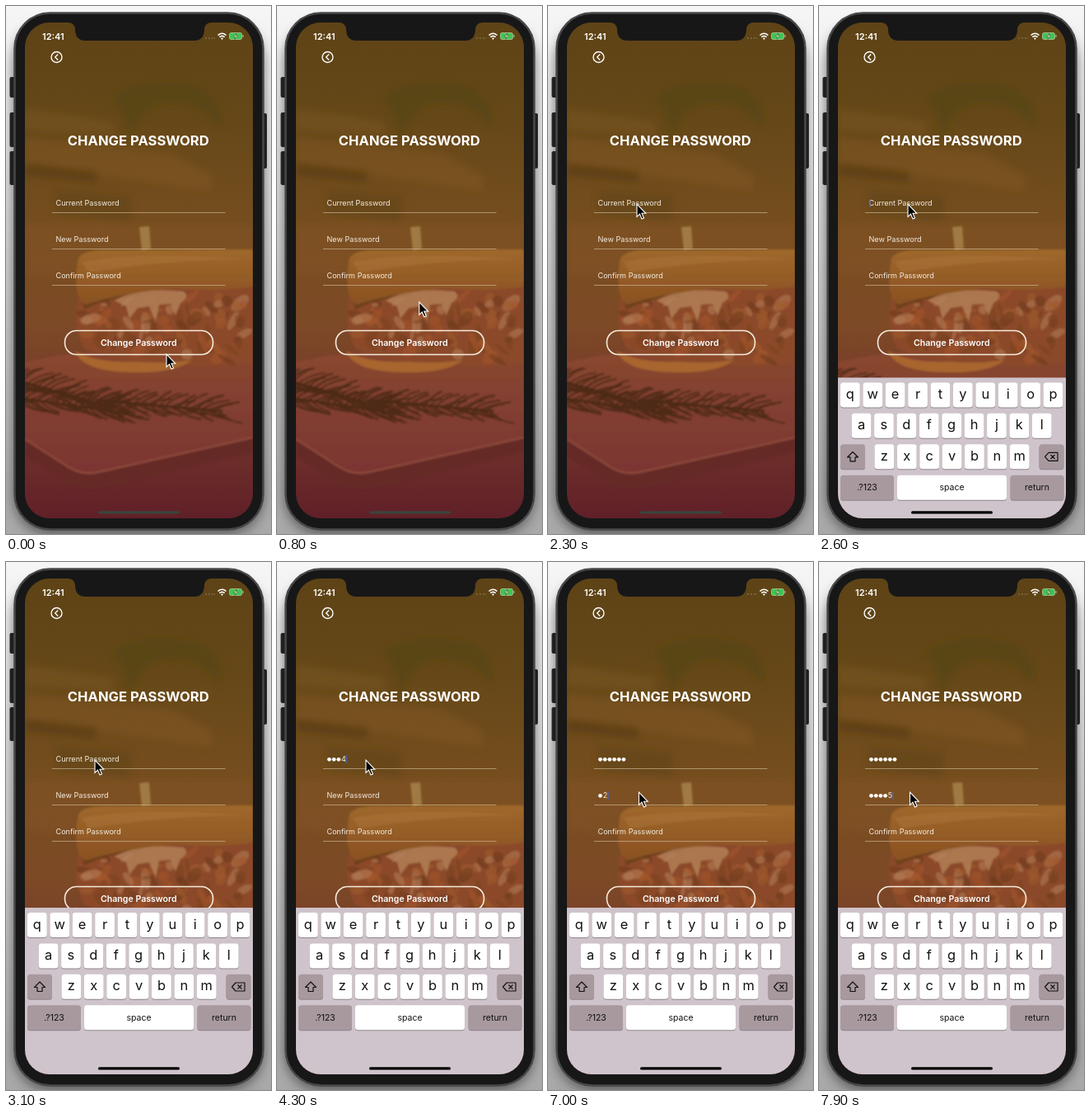
Write an HTML page that moves like this. It is 322 by 640 pixels and loops after 8000 ms.

```html
<!DOCTYPE html>
<html lang="en">
<head>
<meta charset="utf-8">
<title>Change password</title>
<style>
html, body { margin: 0; width: 100%; height: 100%; overflow: hidden; background: #ddd; }
svg { display: block; width: 100vw; height: 100vh; }
text { font-family: Inter, "Open Sans", sans-serif; fill: #fff; }
.bold { font-weight: 600; }
.hint, .digit { font-size: 9.1px; fill: #f3ebdf; }
.line { stroke: #e2cfac; stroke-opacity: .55; }
#board text { fill: #111; text-anchor: middle; }
.icon { fill: none; stroke: #111; stroke-width: 1.2; stroke-linejoin: round; }
</style>
</head>
<body>
<svg viewBox="0 0 322 640">
  <defs>
    <linearGradient id="wall" x2="0" y2="1">
      <stop stop-color="#f6f6f6"/><stop offset=".5" stop-color="#d2d2d2"/><stop offset="1" stop-color="#a8a8a8"/>
    </linearGradient>
    <linearGradient id="tone" x2="0" y2="1">
      <stop stop-color="#5e4316"/><stop offset=".2" stop-color="#664818"/><stop offset=".42" stop-color="#774e1f"/>
      <stop offset=".6" stop-color="#7d4a26"/><stop offset=".78" stop-color="#76382c"/><stop offset="1" stop-color="#602028"/>
    </linearGradient>
    <linearGradient id="wood" x2="0" y2="1">
      <stop stop-color="#89482f"/><stop offset="1" stop-color="#7b3532"/>
    </linearGradient>
    <linearGradient id="bread" x2="0" y2="1">
      <stop stop-color="#9f682b"/><stop offset="1" stop-color="#8a5122"/>
    </linearGradient>
    <filter id="soft" x="-30%" y="-30%" width="160%" height="160%"><feGaussianBlur stdDeviation="7"/></filter>
    <filter id="haze" x="-30%" y="-30%" width="160%" height="160%"><feGaussianBlur stdDeviation="4"/></filter>
    <filter id="edge"><feGaussianBlur stdDeviation=".9"/></filter>
    <clipPath id="screen"><rect x="23" y="20" width="277" height="601" rx="30"/></clipPath>
  </defs>

  <rect width="322" height="640" fill="url(#wall)"/>
  <rect x="8" y="20" width="306" height="622" rx="48" fill="#333" opacity=".6" filter="url(#soft)"/>
  <g fill="#202022">
    <rect x="4.500" y="86" width="8" height="25" rx="2"/><rect x="4.500" y="129" width="8" height="42" rx="2"/>
    <rect x="4.500" y="176" width="8" height="41" rx="2"/><rect x="309" y="130" width="8" height="67" rx="2"/>
  </g>
  <rect x="10.500" y="8.500" width="302" height="626" rx="43" fill="#171718" stroke="#48484b" stroke-width="2.500"/>

  <g clip-path="url(#screen)">
    <rect x="23" y="20" width="277" height="601" fill="url(#tone)"/>
    <g filter="url(#haze)">
      <path d="M23 125L130 140V156L23 150Z" fill="#7b5620" opacity=".5"/>
      <path d="M23 160L200 178 250 205V225L23 192Z" fill="#82581f" opacity=".5"/>
      <path d="M23 190L110 200V214L23 205Z" fill="#573a12" opacity=".6"/>
      <path d="M60 224L152 230V262L60 252Z" fill="#5f4016" opacity=".5"/>
      <path d="M128 110Q165 82 235 98 265 112 262 150 235 112 190 118 160 125 150 165 145 125 128 110Z" fill="#52450f" opacity=".6"/>
      <path d="M23 265H300V335L23 325Z" fill="#865628" opacity=".4"/>
    </g>
    <g filter="url(#edge)">
      <path d="M23 432Q130 405 300 425V524Q190 552 112 566 92 570 76 560L23 526Z" fill="url(#wood)"/>
      <path d="M23 526L76 560Q92 570 112 566L300 524V541L116 584Q92 588 74 577L23 546Z" fill="#652a28"/>
      <path d="M23 525L76 559Q92 569 112 565L300 523" fill="none" stroke="#94503f" stroke-width="2.500" opacity=".7"/>
      <path d="M88 352Q130 335 300 337V431Q238 440 200 433 140 432 95 415 80 390 88 352Z" fill="#8b4a29"/>
      <g id="filling"></g>
      <path d="M92 357Q130 342 168 345L160 353Q125 352 95 368Z" fill="#633b16" opacity=".7"/>
      <path d="M132 357Q160 340 215 346 225 352 212 360L206 375 200 361 186 362 182 383 174 364 160 366 150 379 146 364Z" fill="#b5835a" opacity=".8"/>
      <path d="M84 418Q110 433 155 431 200 434 226 429 205 446 152 444 92 443 84 418Z" fill="#a8652f"/>
      <path d="M88 306Q94 294 130 296L300 295V340Q255 347 205 342 145 347 96 362 80 350 88 306Z" fill="url(#bread)"/>
      <path d="M92 310Q165 297 292 307Q200 307 100 323Z" fill="#ad783a" opacity=".45"/>
      <path d="M162 268L174 267 176 294 165 296Z" fill="#a07a42"/>
      <g id="herb" fill="none" stroke="#4d2a18" stroke-linecap="round"></g>
    </g>

    <path d="M75 20Q83 20 84 28 84 42 97 42H228Q241 42 241 28 242 20 250 20Z" fill="#171718"/>
    <text class="bold" x="44" y="41" font-size="11">12:41</text>
    <path d="M242 39h2m2 0h2m2 0h2m1 0h1" stroke="#ccb" opacity=".45"/>
    <g fill="none" stroke="#fff" stroke-width="1.600">
      <path d="M257.500 35.500Q262.500 31 267.500 35.500M259.300 37.600Q262.500 35 265.700 37.600"/>
    </g>
    <path d="M261 39L262.500 41 264 39Q262.500 38 261 39Z" fill="#fff"/>
    <rect x="271.500" y="32.500" width="15" height="8" rx="2" fill="#42c452" stroke="#b5c79c" stroke-width=".8"/>
    <path d="M288 35v3" stroke="#b5c79c"/>
    <path d="M280 33l-3.500 4h2.500l-1 3.500 3.500-4.500h-2.500z" fill="#fff" stroke="#25351a" stroke-width=".5"/>

    <g fill="none" stroke="#fff" stroke-width="1.350">
      <circle cx="61.500" cy="62" r="6.500"/><path d="M63.200 58.500L59.700 62 63.200 65.500"/>
    </g>
    <text x="160.800" y="169.400" font-size="16.600" font-weight="700" text-anchor="middle">CHANGE PASSWORD</text>
    <g id="fields"></g>
    <rect x="71.500" y="393.500" width="180" height="29" rx="14" fill="none" stroke="#f6ebdc" stroke-width="1.600"/>
    <text class="bold" x="161.300" y="412.200" font-size="10.600" text-anchor="middle">Change Password</text>

    <g id="board"><rect x="23" y="419" width="277" height="240" fill="#cfc4cb"/></g>
    <rect id="home" x="112" y="612.300" width="99" height="3.200" rx="1.600"/>
  </g>
  <path id="mouse" d="M0 0V15.500L3.500 12.200 6 18 8.500 17 6 11.300H10.800Z" fill="#000" stroke="#fff" stroke-width="1.100"/>
</svg>
<script>
const LOOP = 8000, PITCH = 5.7, TAP1 = 2400, TAP2 = 5700;
const $ = id => document.getElementById(id);

function add(parent, tag, attrs, label) {
  const node = document.createElementNS("http://www.w3.org/2000/svg", tag);
  for (const k in attrs) node.setAttribute(k, attrs[k]);
  if (label) node.textContent = label;
  return parent.appendChild(node);
}

let seed = 11;
const rand = () => (seed = (seed * 16807) % 2147483647) / 2147483647;

function drawFood() {
  const tones = ["#a0592f", "#6f3c1e", "#b07a55", "#7d4222", "#a4552c"];
  for (let i = 0; i < 80; i++) {
    const x = 94 + rand() * 206, y = 352 + rand() * (58 + (x - 94) * .12);
    add($("filling"), "ellipse", {
      cx: x, cy: y, rx: 4 + rand() * 9, ry: 2 + rand() * 5, fill: tones[i % 5],
      opacity: .6, transform: `rotate(${rand() * 180} ${x} ${y})`
    });
  }
  const stem = (x0, y0, x1, y1, n) => {
    add($("herb"), "path", { d: `M${x0} ${y0}L${x1} ${y1}`, "stroke-width": 3 });
    for (let i = 0; i < n; i++) {
      const p = i / n, x = x0 + (x1 - x0) * p, y = y0 + (y1 - y0) * p;
      const dy = (i % 2 ? 1 : -1) * (5 + rand() * 12);
      add($("herb"), "path", {
        d: `M${x} ${y}q${8 + rand() * 6} ${dy * .8} ${20 + rand() * 12} ${dy}`,
        "stroke-width": 2 + rand() * 1.2, opacity: .8
      });
    }
  };
  stem(0, 450, 130, 487, 40);
  stem(0, 473, 150, 494, 40);
  stem(110, 478, 262, 491, 40);
}

function drawKeys() {
  const board = $("board");
  const key = (x, y, w, fill, label, size) => {
    add(board, "rect", { x, y: y + 1, width: w, height: 30, rx: 3.5, fill: "#8f858c" });
    add(board, "rect", { x, y, width: w, height: 30, rx: 3.5, fill });
    if (label) add(board, "text", { x: x + w / 2, y: y + (size > 12 ? 19.6 : 18.6), "font-size": size }, label);
  };
  const dark = "#a8999f";
  ["qwertyuiop", "asdfghjkl", "zxcvbnm"].forEach((row, r) =>
    [...row].forEach((c, i) => key([26, 39.7, 67.5][r] + i * 27.4, 425 + r * 37.4, 23.7, "#fff", c, 16.4)));
  key(26, 499.8, 30, dark);
  key(267.500, 499.8, 30, dark);
  key(26, 537.2, 65, dark, ".?123", 10.5);
  key(95, 537.2, 133, "#fff", "space", 10.5);
  key(232.500, 537.2, 65, dark, "return", 10.5);
  add(board, "path", { class: "icon", d: "M41 509L34.500 515.500H38V520.500H44V515.500H47.500Z" });
  add(board, "path", { class: "icon", d: "M274.500 515L279 510H290V520H279ZM281.500 512.500L286.500 517.500M286.500 512.500L281.500 517.500" });
}

const makeField = (name, y) => {
  const g = $("fields");
  add(g, "path", { class: "line", d: `M56 ${y + 11.5}H266.500` });
  return {
    hint: add(g, "text", { class: "hint", x: 60.5, y: y + 3.3 }, name),
    dots: Array.from({ length: 6 }, (_, i) => add(g, "circle", { cx: 63.5 + i * PITCH, cy: y + .3, r: 2.4, fill: "#fff" })),
    digit: add(g, "text", { class: "digit", y: y + 3.3 }),
    caret: add(g, "rect", { y: y - 5, width: 1.6, height: 10, fill: "#4668b8", opacity: .8 })
  };
};

drawFood();
drawKeys();
const fields = ["Current Password", "New Password", "Confirm Password"].map((n, i) => makeField(n, 239 + i * 44));

const show = (node, on) => node.setAttribute("visibility", on ? "visible" : "hidden");

// Digits arrive every 300 ms; the newest stays readable while focused.
function setField(f, t, focus, first, blur) {
  const n = t < first ? 0 : Math.min(6, Math.floor((t - first) / 300) + 1);
  const active = t >= focus && t < blur;
  const plain = active && n > 0;
  const last = n ? first + (n - 1) * 300 : focus;
  show(f.hint, !n);
  f.dots.forEach((d, i) => show(d, i < n - plain));
  f.digit.textContent = plain ? n : "";
  f.digit.setAttribute("x", 61 + (n - 1) * PITCH);
  f.caret.setAttribute("x", 60.8 + n * PITCH);
  show(f.caret, active && (t - last) % 1000 < 550);
}

const path = [[300, 195, 422], [1600, 128, 231], [2200, 108, 240], [5000, 108, 240], [5400, 109.5, 279], [6000, 110.5, 279]];
function mouseAt(t) {
  const i = path.findIndex(p => p[0] > t);
  if (i < 1) return path[i ? path.length - 1 : 0].slice(1);
  const [a, b] = [path[i - 1], path[i]], p = (t - a[0]) / (b[0] - a[0]), e = p * p * (3 - 2 * p);
  return [a[1] + (b[1] - a[1]) * e, a[2] + (b[2] - a[2]) * e];
}

function draw(now) {
  const t = now % LOOP, k = Math.max(0, t - TAP1) * .0166;
  $("board").setAttribute("transform", `translate(0 ${204 * (1 + k) * Math.exp(-k)})`);
  $("home").setAttribute("fill", t < TAP1 ? "#3b443d" : "#000");
  $("mouse").setAttribute("transform", `translate(${mouseAt(t)})`);
  setField(fields[0], t, TAP1, 3300, TAP2);
  setField(fields[1], t, TAP2, 6600, LOOP);
  setField(fields[2], t, LOOP, LOOP, LOOP);
  requestAnimationFrame(draw);
}
draw(performance.now());
</script>
</body>
</html>
```
